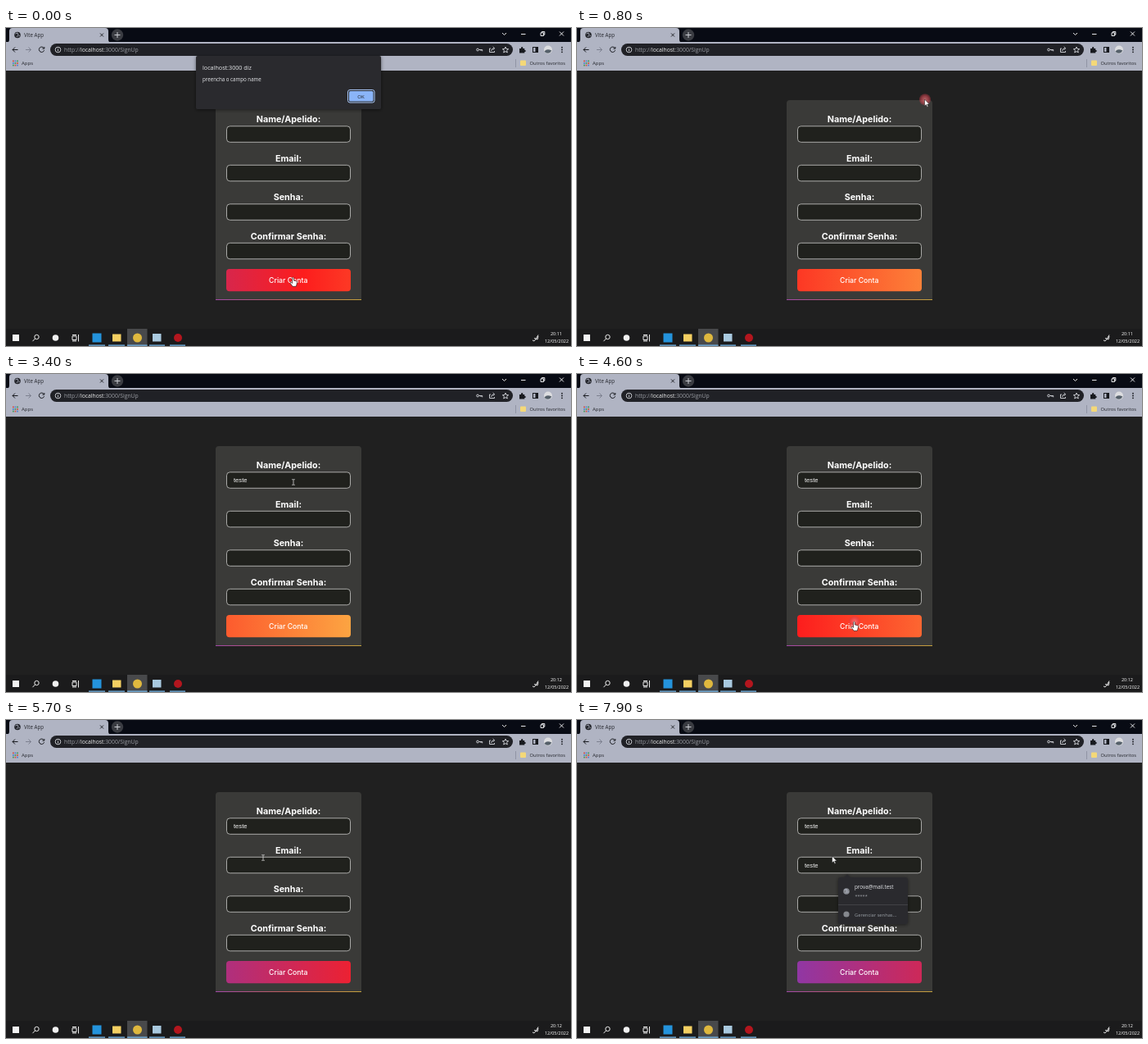
Animation of 690x388 px, one loop 8000 ms. Source, as an HTML page:

```html
<!DOCTYPE html>
<html lang="pt">
<head>
<meta charset="utf-8">
<title>Vite App</title>
<style>
  html, body { margin: 0; width: 100%; height: 100%; overflow: hidden; background: #202020; }
  svg { display: block; width: 100%; height: 100%; }
  text { font-family: "Open Sans", "Noto Sans", sans-serif; white-space: pre; }
  .label { font: 700 10.75px Inter, sans-serif; fill: #fff; text-anchor: middle; }
  .typed { font: 7.6px "Liberation Sans", Arial, sans-serif; fill: #f4f4f4; }
  .mid { text-anchor: middle; }
  .line { fill: none; stroke-width: 1; }
</style>
</head>
<body>
<svg viewBox="0 0 690 388" preserveAspectRatio="none">
  <defs>
    <linearGradient id="flow" gradientUnits="userSpaceOnUse" y1="0" y2="0">
      <stop stop-color="#833ab4"/><stop offset=".5" stop-color="#fd1d1d"/><stop offset="1" stop-color="#fcb045"/>
    </linearGradient>
    <linearGradient id="edge">
      <stop stop-color="#a348a8"/><stop offset=".5" stop-color="#c06058"/><stop offset="1" stop-color="#c4a23c"/>
    </linearGradient>
    <radialGradient id="glow">
      <stop stop-color="#ff8a90"/><stop offset=".6" stop-color="#e8505c" stop-opacity=".85"/><stop offset="1" stop-color="#d83848" stop-opacity=".45"/>
    </radialGradient>
    <filter id="shadow" x="-10%" y="-20%" width="120%" height="150%">
      <feDropShadow dx="0" dy="1" stdDeviation="2" flood-opacity=".5"/>
    </filter>
    <g id="globe"><circle r="3.8"/><path d="M-2.5-1.5 0-2.6 1 0-1 2.4M1.5 1.8 2.8.4" fill="none" stroke="#b1b5c4" stroke-width=".9"/></g>
  </defs>

  <rect width="690" height="388" fill="#202020"/>

  <!-- browser frame -->
  <rect width="690" height="18" fill="#080b14"/>
  <rect y="17" width="690" height="35" fill="#b0b4c3"/>
  <path d="M0 18Q4 18 4 14V4Q4 0 8 0H121Q125 0 125 4V14Q125 18 129 18Z" fill="#b0b4c3"/>
  <use href="#globe" x="14" y="8.5" fill="#25272d"/>
  <text x="22" y="11" font-size="6.2" fill="#25272d">Vite App</text>
  <path class="line" d="M115 6.5l4 4m0-4l-4 4" stroke="#25272d"/>
  <circle cx="136" cy="8.5" r="7.2" fill="#3a3c42"/>
  <path class="line" d="M132.500 8.500h7m-3.500-3.500v7" stroke="#c8cad0"/>
  <g class="line" stroke="#e4e5e8">
    <path d="M606 6l2.500 2.500L611 6M629 7.500h5.500M653 5.800h3.500v3.700H653ZM654.300 5.800V4.500h3.500v3.700h-1.300M676 4.500l5 5m0-5l-5 5" fill="none"/>
  </g>
  <g class="line" stroke="#17191e" stroke-width="1.200">
    <path d="M14.500 26.500H8M11 23.500l-3 3 3 3"/>
    <path d="M24 26.500h6.500M27.500 23.500l3 3-3 3" stroke="#7d8190"/>
    <path d="M46.200 24.500a3.200 3.200 0 1 0 .4 2.700M46.800 23v2.200h-2.300"/>
  </g>
  <rect x="54" y="19" width="565" height="15" rx="7.500" fill="#202126"/>
  <circle class="line" cx="63.500" cy="26.500" r="3.300" stroke="#c5c7cc"/>
  <path class="line" d="M63.500 26v2.300m0-3.800v.8" stroke="#c5c7cc"/>
  <text x="71" y="29" font-size="6.800" fill="#9a9da4">http://<tspan fill="#eceded">localhost</tspan>:3000/SignUp</text>
  <g class="line" stroke="#c5c7cc">
    <circle cx="576" cy="26.500" r="1.400"/><path d="M577.500 26.500h4.200v1.800M580 26.500v1.500"/>
    <path d="M592 25h-1.500v4.500h6V28M592.500 28q.3-3.200 4-3.200m-1.800-1.800 2 1.800-2 1.800"/>
    <path d="M610 23l1 2.500 2.700.2-2.100 1.700.7 2.600-2.300-1.400-2.300 1.400.7-2.600-2.100-1.700 2.700-.2Z"/>
  </g>
  <path d="M627 25h2q-.3-2 1.200-2t1.100 2h2v2q1.500-.2 1.500 1t-1.500 1v1.500H627Z" fill="#17191e"/>
  <rect class="line" x="643.500" y="23.500" width="6" height="6" stroke="#17191e"/>
  <rect x="646.500" y="23" width="3.500" height="7" fill="#17191e"/>
  <circle cx="662" cy="26.500" r="5" fill="#dcdde0"/><path d="M657.500 28.500q3-4 8.800-1A5 5 0 0 1 657.500 28.500Z" fill="#55606a"/>
  <g fill="#17191e"><circle cx="679" cy="23.700" r=".9"/><circle cx="679" cy="26.500" r=".9"/><circle cx="679" cy="29.300" r=".9"/></g>
  <g id="apps"></g>
  <text x="19" y="45" font-size="6" fill="#25272d">Apps</text>
  <path d="M622.500 38v10" stroke="#9094a4"/>
  <rect x="628" y="39.500" width="7" height="6.500" rx="1" fill="#f4d878"/>
  <text x="639.500" y="45" font-size="5.750" fill="#25272d">Outros favoritos</text>

  <!-- form -->
  <path d="M256 331.500V92q0-4 4-4h170q4 0 4 4v239.500Z" fill="#3a3a38"/>
  <rect x="256" y="331" width="178" height="1" fill="url(#edge)"/>
  <g id="fields"></g>
  <rect x="269" y="294" width="152" height="27.300" rx="4" fill="url(#flow)"/>
  <text class="mid" x="344.800" y="311" style="font:500 8.700px Inter,sans-serif" fill="#fff">Criar Conta</text>
  <text id="name" class="typed" x="278" y="132.300"></text>
  <text id="email" class="typed" x="278" y="179.800"></text>
  <rect id="caret" width=".9" height="9" fill="#eee"/>

  <!-- saved login popup -->
  <g id="popup">
    <path d="M319 194q0-2 2-2h5l4-4 4 4h68q2 0 2 2v53q0 2-2 2h-81q-2 0-2-2Z" fill="#292a2d" filter="url(#shadow)"/>
    <path d="M319 225.500h85" stroke="#414246"/>
    <use href="#globe" x="329" y="209" fill="#85888e"/>
    <circle cx="329" cy="237" r="3.600" fill="#85888e"/>
    <text x="339" y="205.500" font-size="6.300" fill="#e8eaed">prova@mail.test</text>
    <text x="339.500" y="217" font-size="5.500" fill="#a5a8ae">*****</text>
    <text x="339" y="239.500" font-size="5.750" fill="#9aa0a6">Gerenciar senhas...</text>
  </g>

  <!-- alert -->
  <g id="alert">
    <rect x="232" y="34" width="226" height="65" rx="2" fill="#292a2d" filter="url(#shadow)"/>
    <text x="240" y="50.500" font-size="7.200" fill="#e8eaed">localhost:3000 diz</text>
    <text id="message" x="240" y="64.600" font-size="6.200" fill="#e8eaed"></text>
    <rect x="417.500" y="75.500" width="32.500" height="15.500" rx="2.500" fill="#292a2d" stroke="#a9c6f5"/>
    <rect x="419" y="77" width="29.500" height="12.500" rx="1.500" fill="#8ab4f8"/>
    <text class="mid" x="433.500" y="85.500" font-size="6" fill="#202124">OK</text>
  </g>

  <!-- taskbar -->
  <rect y="367" width="690" height="21" fill="#1b1b1c"/>
  <rect x="148" y="367" width="24.500" height="21" fill="#48494b"/>
  <rect x="8" y="374" width="8" height="8" fill="#f2f2f2"/>
  <g class="line" stroke="#ececec">
    <circle cx="37.500" cy="377" r="2.700"/><path d="M35.500 379l-3 3.200"/>
    <path d="M81 376h5v4.500h-5ZM81 374.500h5M81 382h5M88.500 374v8.500"/>
    <path d="M643 381q2 2 3.500-.5l3.500-6M645 378.500l4 1.500 1-4"/>
  </g>
  <circle cx="60.500" cy="378" r="3.800" fill="#f0f0f0"/>
  <rect x="105.500" y="372.500" width="11" height="11" fill="#2493dc"/>
  <rect x="130" y="373.500" width="10.500" height="9" fill="#f4cf62"/>
  <circle cx="160.500" cy="378" r="5.500" fill="#dfb83e"/>
  <rect x="179" y="373" width="10.500" height="9.500" fill="#a9c9df"/>
  <circle cx="210" cy="378" r="5" fill="#b3161e"/>
  <path d="M101 387.200h20M125 387.200h20M148 387.200h24.500M175 387.200h19M200 387.200h19" stroke="#76b9ed" stroke-width="1.300"/>
  <text id="clock" class="mid" x="672" y="375.300" font-size="5.500" fill="#fff"></text>
  <text class="mid" x="672.500" y="384" font-size="5.500" fill="#fff">12/05/2022</text>

  <!-- pointer -->
  <circle id="click" r="7" fill="url(#glow)"/>
  <g id="pointer">
    <path id="arrow" d="M0 0V8.200L1.900 6.500 3.200 9.400 4.500 8.800 3.200 6H5.800Z" fill="#fff" stroke="#111" stroke-width=".5"/>
    <path id="hand" d="M-.9.800Q0-.6.900.800V4l3.300.8q1 .4.800 1.600L4.300 9.500 3.700 11.300H-.5L-3.300 7.400Q-3.500 6-2.200 6.300L-.9 7.400Z" fill="#fff" stroke="#111" stroke-width=".6"/>
    <path id="beam" class="line" d="M-1.800-3.300H-.4L0-3 .4-3.300H1.800M0-3V3M-1.800 3.300H-.4L0 3 .4 3.300H1.800" stroke="#d5d5d5" style="stroke-width:.8"/>
  </g>
</svg>
<script>
const LOOP = 8000, FIELD_GAP = 47.5, FLOW_WIDTH = 608;
const $ = id => document.getElementById(id);
const show = (id, on) => { $(id).style.display = on ? "" : "none"; };
const fieldTop = i => 119.5 + i * FIELD_GAP;

$("fields").innerHTML = ["Name/Apelido:", "Email:", "Senha:", "Confirmar Senha:"].map((label, i) =>
  `<text class="label" x="345" y="${115.2 + i * FIELD_GAP}">${label}</text>
   <rect x="269.500" y="${fieldTop(i) + .3}" width="151" height="19.500" rx="4" fill="#20211d" stroke="#b9b9b7" stroke-width=".9"/>`).join("");

const dotColors = ["#d84a3e", "#4a7fd8", "#3f9a58"];
$("apps").innerHTML = Array.from({ length: 9 }, (_, i) =>
  `<rect x="${8 + i % 3 * 2.6}" y="${39.5 + Math.floor(i / 3) * 2.6}" width="1.700" height="1.700" fill="${dotColors[(i + Math.floor(i / 3)) % 3]}"/>`).join("");

// [time, x, y] of the pointer's hot spot
const path = [
  [0, 350.5, 304], [100, 350.5, 304], [550, 424.5, 87], [900, 424.5, 87],
  [1400, 333, 135], [2400, 333, 135], [2800, 351, 132], [3500, 351, 132],
  [4200, 338.5, 302], [4700, 338.5, 302], [5000, 441, 115], [5200, 427, 83],
  [5450, 427, 83], [5700, 314, 168], [5900, 314, 168], [6150, 317, 176],
  [6500, 317, 176], [7200, 311.5, 166], [LOOP, 311.5, 166]
];
// [time, left edge of the button within the wide gradient]
const flow = [
  [0, .345], [600, .53], [800, .59], [1200, .67], [1600, .72], [2000, .745], [2500, .745],
  [3400, .71], [4100, .6], [4600, .5], [5100, .34], [5700, .18], [6200, .11], [6800, .07],
  [7400, .05], [LOOP, .055]
];
const alerts = [
  { from: 0, to: 700, field: "name" },
  { from: 4700, to: 5500, field: "email" }
];
const inputs = [
  { id: "name", focus: 1500, blur: 4500, start: 2400, step: 110 },
  { id: "email", focus: 6200, blur: LOOP, start: 6800, step: 125 }
];
const clicks = [600, 1450, 4500, 5350, 6150];
const WORD = "teste", LETTER_ENDS = [0, 2.1, 6.3, 10.1, 12.2, 16.5];

function sample(keys, t, ease = k => k) {
  const i = Math.max(1, keys.findIndex(key => key[0] >= t));
  const [a, b] = [keys[i - 1], keys[i]];
  const k = ease((t - a[0]) / (b[0] - a[0]));
  return a.slice(1).map((v, j) => v + (b[j + 1] - v) * k);
}
const smooth = k => k * k * (3 - 2 * k);

function drawInputs(t) {
  show("caret", false);
  inputs.forEach(({ id, focus, blur, start, step }, row) => {
    const count = t < start ? 0 : Math.min(WORD.length, Math.floor((t - start) / step) + 1);
    $(id).textContent = WORD.slice(0, count);
    if (t < focus || t >= blur) return;
    const lastKey = count ? start + (count - 1) * step : focus;
    show("caret", Math.floor((t - lastKey) / 500) % 2 === 0);
    $("caret").setAttribute("x", 277.7 + LETTER_ENDS[count]);
    $("caret").setAttribute("y", fieldTop(row) + 5.3);
  });
}

function drawPointer(t) {
  const [x, y] = sample(path, t, smooth);
  const inside = (top, height) => x > 269 && x < 421 && y >= top && y <= top + height;
  const blocked = alerts.some(a => t > a.from + 100 && t < a.to);
  const kind = inside(294, 27) ? "hand"
    : !blocked && [0, 1, 2, 3].some(i => inside(fieldTop(i), 20)) ? "beam" : "arrow";
  ["arrow", "hand", "beam"].forEach(id => show(id, id === kind));
  $("pointer").setAttribute("transform", `translate(${x} ${y})`);

  const pressed = clicks.find(c => t >= c && t < c + 300);
  show("click", pressed !== undefined);
  if (pressed === undefined) return;
  $("click").setAttribute("transform", `translate(${x + .5} ${y + .3})`);
  $("click").setAttribute("opacity", .8 - (t - pressed) / 1500);
}

function draw(t) {
  const open = alerts.find(a => t >= a.from && t < a.to);
  show("alert", open);
  if (open) $("message").textContent = "preencha o campo " + open.field;

  // an open alert pauses the page
  const [edge] = sample(flow, open ? open.from : t);
  const left = 269 - edge * FLOW_WIDTH;
  $("flow").setAttribute("x1", left);
  $("flow").setAttribute("x2", left + FLOW_WIDTH);

  show("popup", t >= 6300);
  $("clock").textContent = t < 2800 ? "20:11" : "20:12";
  drawInputs(t);
  drawPointer(t);
}

const began = performance.now();
function tick() {
  draw((performance.now() - began) % LOOP);
  requestAnimationFrame(tick);
}
tick();
</script>
</body>
</html>
```
